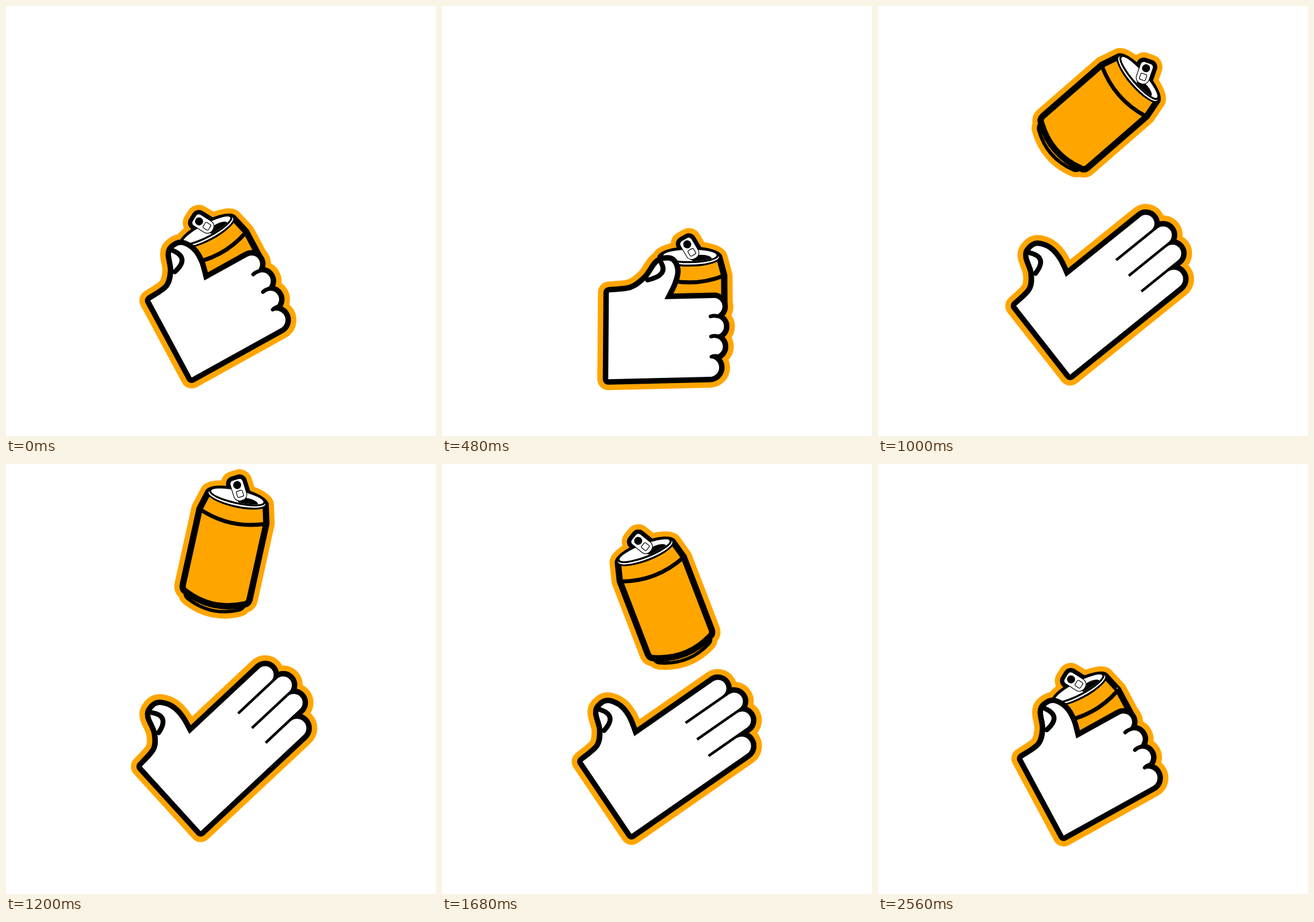
Recreate the animation shown at these times as an HTML page with a canvas. Size 748x748 px, loop 2600 ms.

```html
<!DOCTYPE html>
<html lang="en">
<head>
<meta charset="utf-8">
<title>Can toss</title>
<style>
  html, body { margin: 0; width: 100%; height: 100%; overflow: hidden; background: #fff; }
  canvas { display: block; }
</style>
</head>
<body>
<canvas id="stage" width="748" height="748"></canvas>
<script>
const ctx = document.getElementById('stage').getContext('2d');
const ORANGE = '#ffa500', BLACK = '#000', WHITE = '#fff';
const LOOP = 2600, STEP = 40, RELEASE = 540, CATCH = 1840;
const RAD = Math.PI / 180;

// Timing: progress of t through a phase, shaped by an easing.
const linear = u => u;
const easeOut = power => u => 1 - (1 - u) ** power;
const easeInOut = u => u < 0.5 ? 2 * u * u : 1 - 2 * (1 - u) ** 2;
const sineOut = u => Math.sin(u * Math.PI / 2);
const phase = (t, from, to, ease = linear) =>
  ease(Math.min(1, Math.max(0, (t - from) / (to - from))));
const lerp = (a, b, k) => a + (b - a) * k;

function handPose(t) {
  const angle = -29
    + 58 * phase(t, 0, 300, easeInOut)
    - 54.5 * phase(t, 300, 640, easeInOut)
    - 18.5 * phase(t, 640, 1340, sineOut)
    + 15 * phase(t, 1400, 1900, easeInOut);
  const recoil = phase(t, 1780, CATCH) * Math.exp(-Math.max(0, t - CATCH) / 100);
  return {
    x: 300, y: 579 + 11 * recoil, angle,
    bend: phase(t, 0, 240, easeInOut) - phase(t, 400, 560, easeInOut)
        + 0.25 * Math.sin(Math.PI * phase(t, 1800, 2160)),
    open: phase(t, 500, 600, easeInOut) - phase(t, 1760, CATCH, easeInOut)
  };
}

function heldCan(t) {
  const hand = handPose(t), c = Math.cos(hand.angle * RAD), s = Math.sin(hand.angle * RAD);
  return { t, x: hand.x + 133 * c + 51 * s, y: hand.y + 133 * s - 51 * c, angle: hand.angle + 1 };
}

// The can leaves the hand, makes one full turn and lands in it again.
const caught = heldCan(CATCH);
const flight = [
  heldCan(RELEASE),
  { t: 680, x: 415, y: 330, angle: -117 },
  { t: 1000, x: 386, y: 184, angle: -311 },
  { t: 1400, x: 381.5, y: 128, angle: -368 },
  { t: 1680, x: 385, y: 235, angle: -381 },
  { ...caught, angle: caught.angle - 360 }
];

// Monotone cubic curve of one property through the flight points.
function glide(t, key) {
  const secant = i => (flight[i + 1][key] - flight[i][key]) / (flight[i + 1].t - flight[i].t);
  const slope = i => {
    if (i === 0) return secant(0);
    if (i === flight.length - 1) return secant(i - 1);
    const a = secant(i - 1), b = secant(i);
    return a * b <= 0 ? 0 : 2 * a * b / (a + b);
  };
  const i = flight.findIndex((p, n) => n < flight.length - 1 && t < flight[n + 1].t);
  const p = flight[i], q = flight[i + 1], d = q.t - p.t, u = (t - p.t) / d, w = 1 - u;
  return p[key] * (1 + 2 * u) * w * w + q[key] * u * u * (3 - 2 * u)
       + d * u * w * (slope(i) * w - slope(i + 1) * u);
}

function canPose(t) {
  if (t < RELEASE || t >= CATCH) return { ...heldCan(t), held: true };
  return { x: glide(t, 'x'), y: glide(t, 'y'), angle: glide(t, 'angle') };
}

function placed(pose, draw) {
  ctx.save();
  ctx.translate(pose.x, pose.y);
  ctx.rotate(pose.angle * RAD);
  ctx.scale(pose.scale ?? 1, pose.scale ?? 1);
  draw();
  ctx.restore();
}

function stroke(path, color, width, cap = 'round') {
  ctx.strokeStyle = color;
  ctx.lineWidth = width;
  ctx.lineCap = cap;
  ctx.lineJoin = 'round';
  ctx.stroke(path);
}

function fill(path, color) {
  ctx.fillStyle = color;
  ctx.fill(path);
}

function ellipse(x, y, rx, ry) {
  const path = new Path2D();
  path.ellipse(x, y, rx, ry, 0, 0, 2 * Math.PI);
  return path;
}

function roundRect(x, y, w, h, r) {
  const path = new Path2D();
  path.roundRect(x, y, w, h, r);
  return path;
}

// Can, centred on its body, standing upright.
const body = new Path2D('M-51-88L-59.5-56V80Q-59 88-52 90Q0 114 52 90Q59 88 59.5 80V-56L51-88Z');
const base = new Path2D('M-53 90Q-52 98-46 101Q0 123 46 101Q52 98 53 90');
const band = new Path2D('M-58-55Q0-33 58-55');
const rim = ellipse(0, -89, 55.5, 17.5);
const lid = ellipse(0, -91, 46.5, 10);
const tab = roundRect(-19, -11.5, 38, 23, [6, 10, 10, 6]);
const tabSquare = roundRect(1.5, -5.5, 11, 11, 2);
const TAB_POSE = { x: 0, y: -102.5, angle: 60 };

function canHalo() {
  stroke(body, ORANGE, 29);
  stroke(base, ORANGE, 24);
  stroke(rim, ORANGE, 18);
  placed(TAB_POSE, () => stroke(tab, ORANGE, 32));
}

function canArt() {
  fill(base, ORANGE);
  stroke(base, BLACK, 6);
  fill(body, ORANGE);
  stroke(body, BLACK, 11);
  stroke(band, BLACK, 7, 'butt');
  fill(rim, BLACK);
  placed(TAB_POSE, () => stroke(tab, BLACK, 14));
  fill(ellipse(0, -88, 50.5, 13), WHITE);
  fill(ellipse(0, -90, 50, 12.5), BLACK);
  fill(lid, WHITE);
  ctx.save();
  ctx.clip(lid);
  fill(ellipse(20, -85, 18, 7), BLACK);
  ctx.restore();
  placed(TAB_POSE, () => {
    fill(tab, WHITE);
    stroke(tab, BLACK, 1.2);
    fill(ellipse(-9, 0, 7, 7), BLACK);
    stroke(tabSquare, BLACK, 1.2);
  });
}

// A held can disappears behind the fingers.
function drawCan(can, hand, draw) {
  ctx.save();
  if (can.held) {
    const area = new Path2D();
    area.addPath(roundRect(-400, -400, 800, 352, 0),
                 new DOMMatrix().translate(hand.x, hand.y).rotate(hand.angle));
    ctx.clip(area);
  }
  placed(can, draw);
  ctx.restore();
}

// Hand, fingers along +x, origin at the wrist.
const THUMB = [[-10.5, -82], [28, -86.5], [49, -107], [60, -135], [70, -142], [84, -140],
  [95, -122], [96, -98], [88.5, -67]];
const NAIL = [[51, -105], [86, -113], [66, -139]];
const rowEdge = i => Math.max(-67, 35 * (i - 2));

// Bending leans the thumb forward, more so towards its tip.
function bent(points, bend) {
  return points.map(([x, y]) => {
    const height = Math.max(0, -72 - y) * bend;
    return [x + 0.54 * height, y + 0.24 * height];
  });
}

// Smooth curve through the points, continuing an open path.
function curveThrough(path, points) {
  const at = i => points[Math.min(points.length - 1, Math.max(0, i))];
  for (let i = 0; i < points.length - 1; i++) {
    const [a, b, c, d] = [at(i - 1), at(i), at(i + 1), at(i + 2)];
    path.bezierCurveTo(b[0] + (c[0] - a[0]) / 6, b[1] + (c[1] - a[1]) / 6,
                       c[0] - (d[0] - b[0]) / 6, c[1] - (d[1] - b[1]) / 6, c[0], c[1]);
  }
}

function handPath({ bend, open }) {
  const path = new Path2D(), thumb = bent(THUMB, bend);
  path.moveTo(...thumb[0]);
  curveThrough(path, thumb);
  for (let i = 0; i < 4; i++) {
    const top = rowEdge(i) + (i > 0 ? 2.3 : 0), bottom = rowEdge(i + 1) - (i < 3 ? 2.3 : 0);
    const r = (bottom - top) / 2;
    const tip = lerp(191 - 2.3 * (i - 0.9) ** 2, 281 - 9 * (i - 1.1) ** 2, open);
    const root = lerp(168, 175, open);
    if (i > 0) path.lineTo(root, top);
    path.arc(tip - r, top + r, r, -Math.PI / 2, Math.PI / 2);
    if (i < 3) path.lineTo(root, bottom);
  }
  path.lineTo(-12.5, 70);
  path.closePath();
  return path;
}

function handArt(hand, path) {
  stroke(path, BLACK, 19);
  fill(path, WHITE);
  const [from, control, to] = bent(NAIL, hand.bend), nail = new Path2D();
  nail.moveTo(...from);
  nail.quadraticCurveTo(...control, ...to);
  stroke(nail, BLACK, 8.5);
  if (hand.open > 0.5) return;
  for (let i = 1; i < 4; i++) {
    stroke(new Path2D(`M168 ${rowEdge(i)}q6-2 12 0`), BLACK, 6.5);
  }
}

// Splash and sparkle.
const drop = new Path2D('M0 14C-3 6-6 1-6-6A6 6.5 0 0 1 6-6C6 1 3 6 0 14Z');
const star = new Path2D('M0-9Q1.5-1.5 9 0Q1.5 1.5 0 9Q-1.5 1.5-9 0Q-1.5-1.5 0-9Z');

function effects(t) {
  const list = [];
  for (const side of [-1, 0, 1]) {
    const angle = 8 + 30 * side;
    const reach = 15 - 11 * Math.abs(side) + 66 * phase(t, CATCH, 2280, easeOut(3));
    list.push({
      shape: drop, angle, black: 9, halo: 28,
      x: 358 + reach * Math.sin(angle * RAD), y: 366 - reach * Math.cos(angle * RAD),
      scale: phase(t, CATCH, 1930) - phase(t, 1990, 2260 + 30 * side)
    });
  }
  list.push({
    shape: star, angle: 0, black: 10, halo: 22, x: 416, y: 390,
    scale: 1.55 * (phase(t, 1860, 2240, easeOut(3)) - phase(t, 2240, LOOP))
  });
  return list.filter(e => e.scale > 0.01);
}

function render(t) {
  const hand = handPose(t), can = canPose(t), extras = effects(t);
  const palm = handPath(hand);
  ctx.fillStyle = WHITE;
  ctx.fillRect(0, 0, 748, 748);

  drawCan(can, hand, canHalo);
  placed(hand, () => stroke(palm, ORANGE, 38));
  extras.forEach(e => placed(e, () => stroke(e.shape, ORANGE, e.halo)));

  drawCan(can, hand, canArt);
  placed(hand, () => handArt(hand, palm));
  extras.forEach(e => placed(e, () => {
    stroke(e.shape, BLACK, e.black);
    fill(e.shape, WHITE);
  }));
}

const start = performance.now();
function tick() {
  const t = (performance.now() - start) % LOOP;
  render(Math.floor(t / STEP) * STEP);
  requestAnimationFrame(tick);
}
tick();
</script>
</body>
</html>
```
